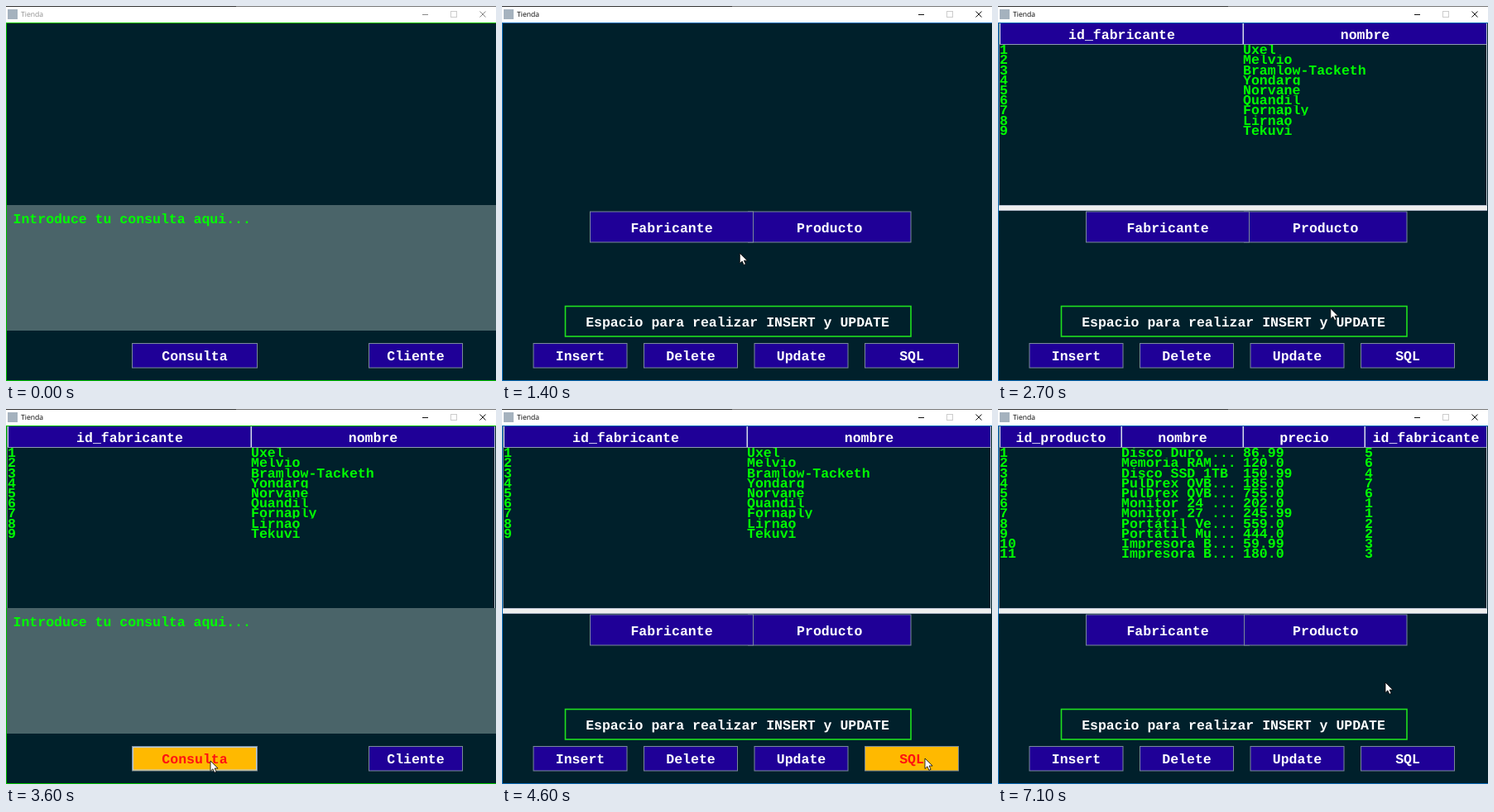
An HTML page that plays this animation: 592 px wide and 454 px high, repeating every 7200 ms.

```html
<!DOCTYPE html>
<html lang="es">
<head>
<meta charset="utf-8">
<title>Tienda</title>
<style>
  html, body { margin: 0; width: 100%; height: 100%; overflow: hidden; background: #00202b; }
  svg { display: block; }
  text {
    font: bold 16.53px "Courier New", "Liberation Mono", monospace;
    text-rendering: geometricPrecision;
    white-space: pre;
    fill: #fff;
  }
  .mid { text-anchor: middle; }
  .green { fill: #0f0; }
  #bar text { font: 8.6px "Open Sans", sans-serif; fill: #000; }
  #bar path { fill: none; stroke: #111; }
  #bar.idle text { fill: #8c8c8c; }
  #bar.idle path { stroke: #888; }
  .btn rect { fill: #1f0097; stroke: #7a8a99; }
  .btn .ring { fill: none; stroke: none; }
  .btn.hot rect { fill: #ffb900; }
  .btn.hot text { fill: #f11; }
  .btn.hot .ring { fill: none; stroke: #b8cfe5; }
  .head rect { fill: #1f0097; }
  .hide { display: none; }
</style>
</head>
<body>
<svg id="stage" width="592" height="454" viewBox="0 0 592 454"></svg>
<script>
const LOOP = 7200, STEP = 100;
const ROW = 12.2, TABLE = { left: 2, right: 590, top: 21, body: 47 };

const makers = ["Uxel", "Melvio", "Bramlow-Tacketh", "Yondarg", "Norvane",
  "Quandil", "Fornaply", "Lirnao", "Tekuvi"];
const products = [
  ["Disco Duro ...", "86.99", 5], ["Memoria RAM...", "120.0", 6],
  ["Disco SSD 1TB", "150.99", 4], ["PulDrex QVB...", "185.0", 7],
  ["PulDrex QVB...", "755.0", 6], ["Monitor 24 ...", "202.0", 1],
  ["Monitor 27 ...", "245.99", 1], ["Portátil Ve...", "559.0", 2],
  ["Portátil Mu...", "444.0", 2], ["Impresora B...", "59.99", 3],
  ["Impresora B...", "180.0", 3]
];

// view, label, x, y, width, height, inner ring while hot
const buttons = [
  ["query", "Consulta", 152, 408, 152, 30.5, true],
  ["query", "Cliente", 438, 408, 114, 30.5],
  ["client", "Producto", 297, 248.5, 197.5, 38, true],
  ["client", "Fabricante", 106, 248.5, 198, 38, true],
  ["client", "Insert", 37.5, 408, 114, 30.5],
  ["client", "Delete", 171, 408, 114, 30.5],
  ["client", "Update", 304.5, 408, 114, 30.5],
  ["client", "SQL", 438, 408, 114, 30.5]
];

// time, x, y of the pointer tip
const path = [
  [0, 600, 470], [300, 529, 426], [800, 529, 426], [1500, 247, 278],
  [2400, 247, 278], [2900, 505, 425], [3200, 505, 425], [3500, 247, 426],
  [3800, 247, 426], [4200, 511, 423], [4700, 511, 423], [5200, 407, 264],
  [5900, 407, 264], [6400, 468, 331], [LOOP, 468, 331]
];

const rect = (x, y, w, h, fill) =>
  `<rect x="${x}" y="${y}" width="${w}" height="${h}" fill="${fill}"/>`;
const text = (s, x, y, cls = "") => `<text x="${x}" y="${y}" class="${cls}">${s}</text>`;
const group = (id, body, cls = "") => `<g id="${id}" class="${cls}">${body}</g>`;
const box = (x, y, w, h, inset, cls = "") =>
  `<rect x="${x + inset}" y="${y + inset}" width="${w - 2 * inset}" height="${h - 2 * inset}" class="${cls}"/>`;
const frame = color =>
  `<rect x=".5" y="20.5" width="600" height="433" fill="none" stroke="${color}"/>`;

function button([, label, x, y, w, h, ring]) {
  return group(label, box(x, y, w, h, .5) + (ring ? box(x, y, w, h, 1.5, "ring") : "") +
    text(label, x + w / 2, y + h / 2 + 6.2, "mid"), "btn");
}

const buttonsOf = view => buttons.filter(b => b[0] === view).map(button).join("");

function table(id, titles, rows) {
  const { left, right, top, body } = TABLE;
  const w = (right - left) / titles.length;
  let out = rect(1, top, 590, 220, "#00202b");
  titles.forEach((title, c) => {
    const x = left + c * w;
    out += `<g class="head">${rect(x, top, w, 25)}${text(title, x + w / 2 + .5, 40, "mid")}</g>` +
      rect(x - .5, top, 1.5, 25, "#d5dcea");
    rows.forEach((row, r) => {
      out += `<svg x="${x}" y="${body + r * ROW}" width="${w}" height="${ROW}">` +
        text(row[c], 0, 11.2, "green") + "</svg>";
    });
  });
  out += rect(1, 20, 590, 1, "#7f93a6") + rect(1, 46, 590, 1, "#8e9bb4") +
    rect(590, top, 1, 220, "#c8d0d8") + rect(1, top, 1, 226, "#5f7888") +
    rect(1, 241, 590, 1, "#b8c2d0") + rect(1, 242, 590, 5, "#eee") +
    rect(1, 247, 590, 1, "#a9b4c4");
  return group(id, out);
}

const titleBar = rect(0, 0, 592, 20, "#fff") + rect(0, 0, 278, 1, "#333") +
  rect(278, 0, 314, 1, "#777") + rect(2, 4, 12, 12, "#a5b2be") + text("Tienda", 18, 13) +
  `<path d="M503 10.5h7M572.5 6.5l7 7m0-7l-7 7"/>` +
  `<rect x="537.5" y="6.5" width="7" height="7" fill="none" stroke="#ccc"/>`;

const queryView = rect(1, 241, 591, 152, "#4a6469") +
  text("Introduce tu consulta aqui...", 8.5, 262.5, "green") +
  buttonsOf("query") + frame("#00c000");

const clientView = buttonsOf("client") +
  `<rect x="76.5" y="363.5" width="417.5" height="36.5" fill="none" stroke="#1fe01f" stroke-width="1.6"/>` +
  text("Espacio para realizar INSERT y UPDATE", 284.5, 388, "mid") + frame("#0a69b4");

const pointer = `<path d="M0 0v12.5l2.9-2.7 2 4.5 2.2-1-2-4.3h4z" fill="#fff" stroke="#000" stroke-width=".8"/>`;

const $ = id => document.getElementById(id);
$("stage").innerHTML = rect(0, 0, 592, 454, "#00202b") + group("bar", titleBar) +
  table("makers", ["id_fabricante", "nombre"], makers.map((m, i) => [i + 1, m])) +
  table("products", ["id_producto", "nombre", "precio", "id_fabricante"],
    products.map((p, i) => [i + 1, ...p])) +
  group("query", queryView) + group("client", clientView) + group("pointer", pointer);

const show = (id, on) => $(id).classList.toggle("hide", !on);

function pointerAt(t) {
  const i = path.findIndex(p => p[0] > t);
  const [t0, x0, y0] = path[i - 1], [t1, x1, y1] = path[i];
  const k = (t - t0) / (t1 - t0);
  return [x0 + (x1 - x0) * k, y0 + (y1 - y0) * k];
}

// The two list buttons overlap; the one repainted last lies on top.
let lastTop = "";
function raise(label) {
  if (label === lastTop) return;
  const other = label === "Producto" ? "Fabricante" : "Producto";
  $(other).after($(label));
  lastTop = label;
}

function draw(t) {
  const view = t < 500 || (t >= 3100 && t < 4400) ? "query" : "client";
  show("query", view === "query");
  show("client", view === "client");
  show("makers", t >= 1700 && t < 5400);
  show("products", t >= 5400);
  $("bar").classList.toggle("idle", t < 200);
  raise(t < 5200 ? "Fabricante" : "Producto");

  const [px, py] = pointerAt(t);
  $("pointer").setAttribute("transform", `translate(${px} ${py})`);
  for (const [owner, label, x, y, w, h] of buttons) {
    const hot = owner === view && px >= x && px <= x + w && py >= y && py <= y + h;
    $(label).classList.toggle("hot", hot);
  }
}

const start = performance.now();
function tick() {
  const t = (performance.now() - start) % LOOP;
  draw(Math.floor(t / STEP) * STEP);
  requestAnimationFrame(tick);
}
tick();
</script>
</body>
</html>
```
